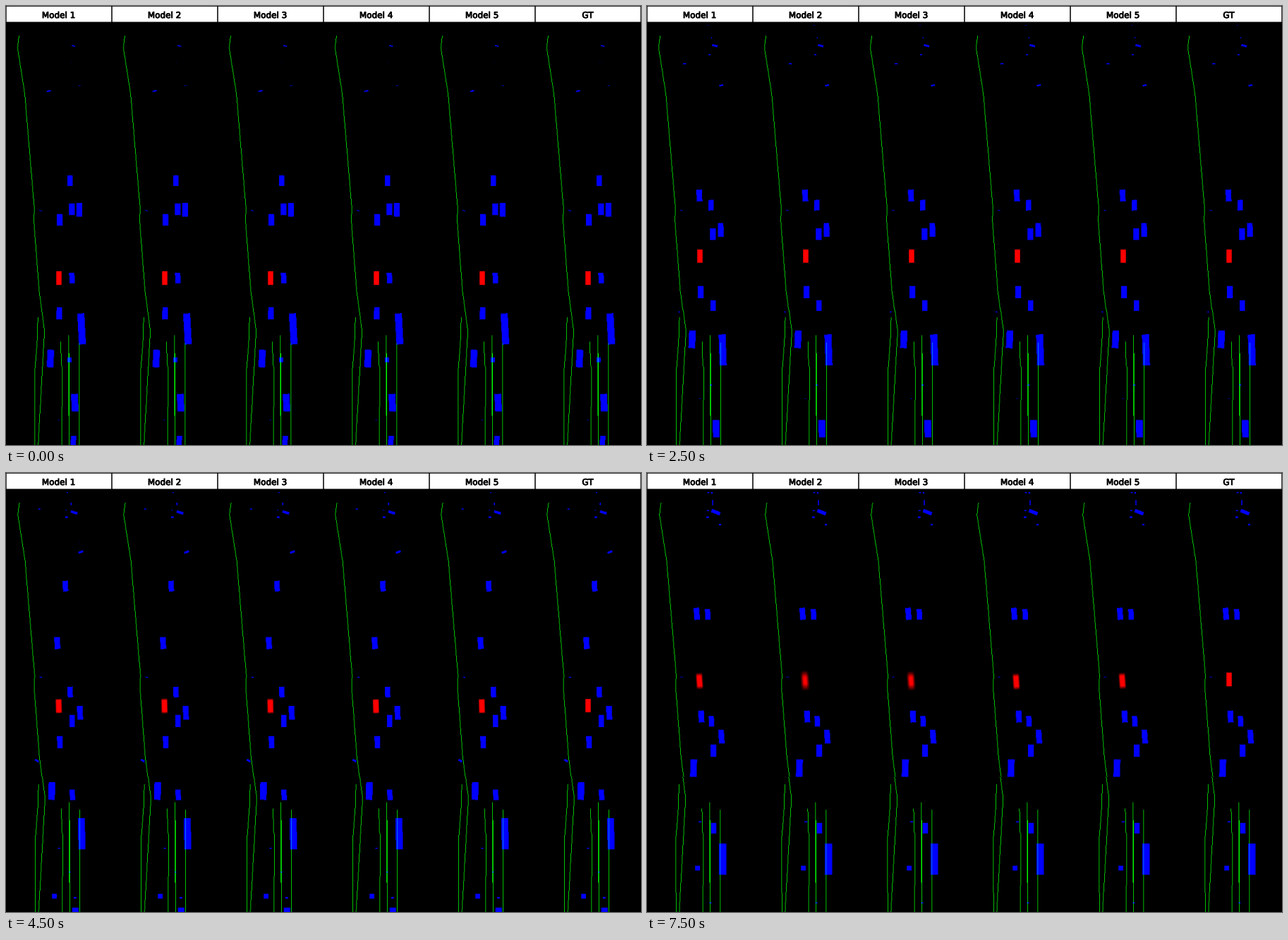
Animation, 900 px wide and 622 px high, one loop 8 s. Source, as a matplotlib script:

```python
import matplotlib.pyplot as plt
import numpy as np
from matplotlib.animation import FuncAnimation
from matplotlib.patheffects import withStroke

W, H, PANEL = 900, 622, 150
FRAMES, STEP_MS = 16, 500
LAST = FRAMES - 1
TITLES = [f"Model {i}" for i in range(1, 6)] + ["GT"]

# The maps are rasterised on a finer grid and scaled down to the stage
CELL = 0.75
ROWS, COLS, HEAD = 830, 200, 30
PX, PY = np.meshgrid((np.arange(COLS) + 0.5) * CELL, (np.arange(ROWS) + 0.5) * CELL)

CAR, SMALL, VAN, TRUCK = (8, 17), (7.5, 15), (9.5, 25), (10, 44)
movers = []


def move(start, end, size, grown=None, tilt=(0, 0), begin=0, arrive=LAST, until=LAST):
    """Box gliding from start to end between two steps, then waiting there."""
    pose0 = np.array([*start, *size, tilt[0]], float)
    pose1 = np.array([*end, *(grown or size), tilt[1]], float)
    movers.append((pose0, pose1, begin, arrive, until))


# Left lane, same way as the ego car
move((76, 303), (70.5, 199.5), CAR, tilt=(-1, -5))
move((75.5, 435.5), (77, 345), CAR, tilt=(2, -3))
move((63, 499.5), (66, 418), VAN, tilt=(3, 1))
move((66.5, 626), (71.5, 560), (7, 7), begin=5)

# Right lanes, oncoming
move((90.5, 247.5), (91.3, 352), SMALL, tilt=(-1, -2))
move((93.3, 288), (94, 393.5), CAR)
move((104, 289), (105.5, 373.5), (8, 19.5), tilt=(0, -4))
move((93.5, 385.5), (94.5, 503), SMALL, tilt=(-2, -1))
move((107.2, 457.5), (107.2, 547), TRUCK, tilt=(-3, 0))
move((97.5, 562), (98.5, 643), VAN, tilt=(-3, 0), arrive=11, until=11)
move((95.5, 616.5), (96, 631), SMALL, tilt=(4, 4), arrive=2, until=2)
move((83.5, 147), (86, 200), SMALL, tilt=(-4, -2), begin=7)

# People and far objects
move((95.5, 56.5), (97.5, 55.5), (5, 1.5), (13, 5), tilt=(10, 22))
move((92, 80), (86, 62.5), (1, 1), (4, 2.3), arrive=8)
move((104, 113), (106, 112), (3, 1), (7, 3), tilt=(-5, -22), arrive=8, until=13)
move((104, 98), (103.5, 73), (1, 1), (2.5, 2), begin=9)
move((60.5, 120.5), (47, 51), (6, 2), (3, 1), tilt=(-12, 0), arrive=9, until=9)
move((49, 290), (49, 289), (3.5, 1), tilt=(20, 0))
move((46, 440), (43, 394.5), (1, 1), (8, 3.5), tilt=(0, 45), begin=4, arrive=11, until=12)
move((87, 27.5), (87, 28), (1, 1), (3, 1.5), begin=5)
move((91, 27), (92, 28), (2, 2), begin=12)
move((91.3, 45.5), (93, 42), (1, 1), (1.5, 8), begin=4)
move((85, 53), (86, 53), (2, 1), (3, 1.5), begin=7)
move((90, 501.5), (91, 537), (6, 7), (3, 1.5), arrive=5, until=5)
move((90.5, 544), (90, 609), (2.5, 1.5), begin=6)
move((74.5, 587), (75, 494.5), (2, 1), (4, 1.5))
move((97.5, 588), (98.5, 644), (4, 1), (1.5, 6), begin=7)

# Final prediction error per panel: dx, dy, blur
ERRORS = [(-0.6, 2.2, 4), (-1, 1.6, 9), (-0.7, 2, 8), (-1.7, 3, 4), (-1.3, 2, 4), (0, 0, 0)]

# Road edges and lane marks as (x, y) corners, top to bottom
LANES = [
    [(18.4, 42), (16.4, 59), (26.6, 124), (40.2, 287), (39.3, 302), (47, 403), (54.6, 460), (45.5, 622)],
    [(45.2, 441), (44.2, 475), (40.8, 518), (41.2, 622)],
    [(77.8, 476), (78.2, 508), (80, 512), (79, 622)],
    [(88.9, 467), (88.9, 580)],
    [(89.6, 492), (89.6, 622)],
    [(103.7, 477), (103.9, 622)],
]


def local(x, y, angle):
    c, s = np.cos(np.radians(angle)), np.sin(np.radians(angle))
    dx, dy = PX - x, PY - y
    return np.abs(dx * c + dy * s), np.abs(dy * c - dx * s)


def box(x, y, w, h, angle=0):
    u, v = local(x, y, angle)
    return (u <= max(w, CELL) / 2) & (v <= max(h, CELL) / 2)


def soft_box(x, y, w, h, angle, blur_u, blur_v):
    u, v = local(x, y, angle)
    return (np.clip((w / 2 - u) / blur_u + 0.5, 0, 1)
            * np.clip((h / 2 - v) / blur_v + 0.5, 0, 1))


def traffic(t):
    mask = np.zeros((ROWS, COLS), bool)
    for pose0, pose1, begin, arrive, until in movers:
        if begin <= t <= until:
            p = min(1, (t - begin) / (arrive - begin))
            mask |= box(*(pose0 + (pose1 - pose0) * p))
    return mask


def lanes(t):
    mask = np.zeros((ROWS, COLS), bool)
    near = 0.8 * np.sin(np.pi * t / FRAMES)
    far = 1.3 * (t / LAST) ** 2
    for lane in LANES:
        x, y = np.array(lane).T
        rows = np.arange(int(y[0] / CELL), int(y[-1] / CELL) + 1)
        yy = rows * CELL
        xx = np.interp(yy, y, x) + np.where(yy < 430, far, near)
        mask[rows, (xx / CELL).astype(int)] = True
    return mask


def ego(t, dx, dy, blur):
    x, y = 75, 385.5 - 6.2 * t
    drift = max(0, (t - 5) / 10)
    if blur == 0 or drift == 0:
        return box(x, y, 8, 19)
    grow = drift ** 1.5
    return soft_box(x + dx * drift, y + dy * grow, 8, 19, -4 * drift,
                    1 + 0.4 * blur * grow, 1 + blur * grow)


def render(t):
    blue = traffic(t)
    green = lanes(t) * np.where(blue, 0.6, 1)
    panels = []
    for error in ERRORS:
        panel = np.dstack([ego(t, *error), green, blue])
        panel[:HEAD] = 0
        panel[1:HEAD, 1:-1] = 1
        panels.append(panel)
    return (np.hstack(panels) * 255).round().astype(np.uint8)


fig = plt.figure(figsize=(W / 100, H / 100), dpi=100, facecolor="black")
ax = fig.add_axes([0, 0, 1, 1])
ax.axis("off")
view = ax.imshow(render(0), extent=(0, W, ROWS * CELL, 0), interpolation="hanning", aspect="auto")
ax.set(xlim=(0, W), ylim=(H, 0))
for i, title in enumerate(TITLES):
    ax.text(i * PANEL + 74.5, 17, title, family="DejaVu Sans", size=8.64, color="black",
            ha="center", va="baseline",
            path_effects=[withStroke(linewidth=0.6, foreground="black")])


def update(t):
    view.set_data(render(t))
    return [view]


anim = FuncAnimation(fig, update, frames=FRAMES, interval=STEP_MS, repeat=True, repeat_delay=0)
plt.show()
```
